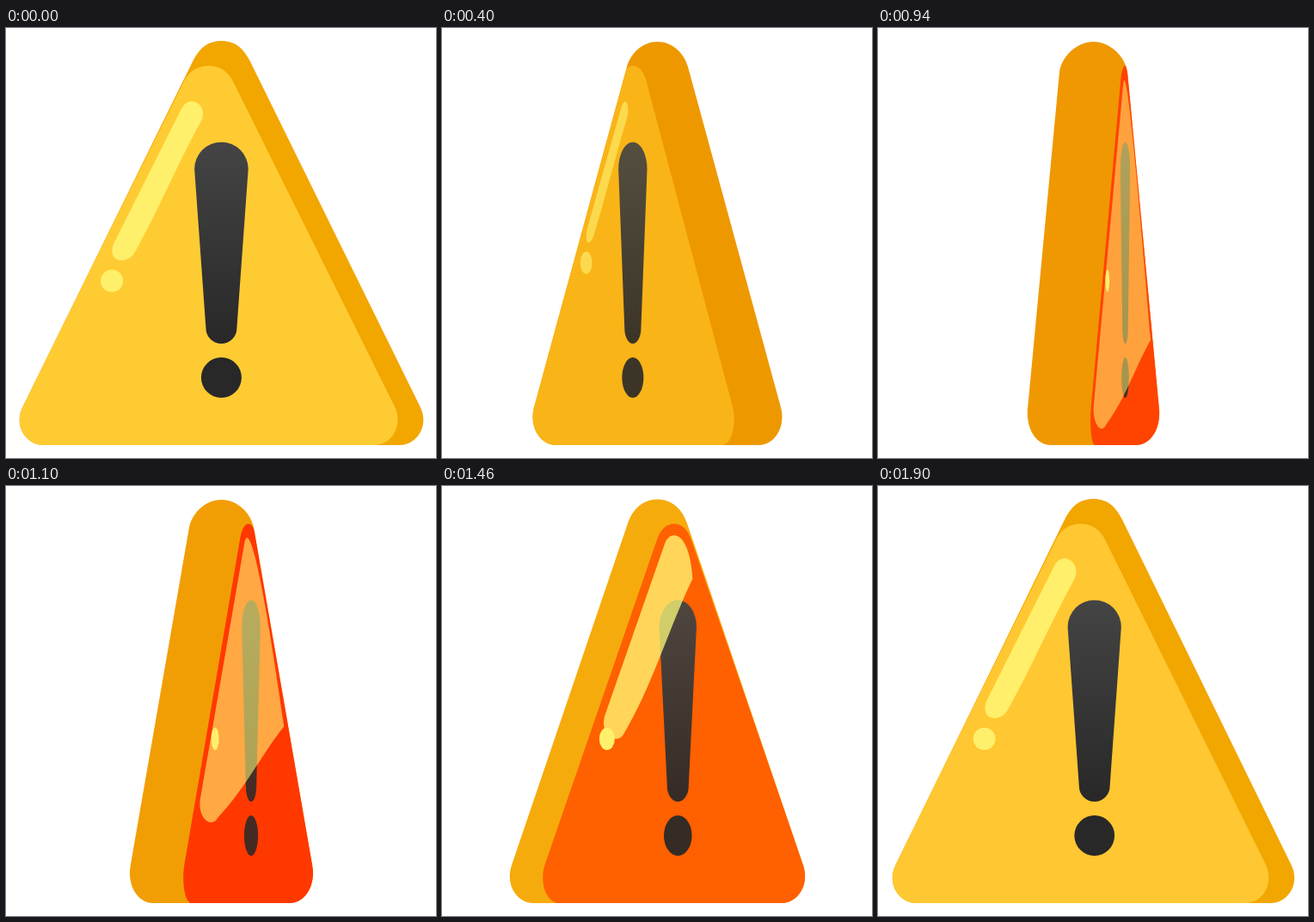
Write an HTML page with a canvas that moves like this. It is 500 px wide and 500 px high and loops after 1.92 s.

```html
<!DOCTYPE html>
<html lang="en">
<head>
<meta charset="utf-8">
<title>Turning warning sign</title>
<style>
html, body { margin: 0; width: 100%; height: 100%; overflow: hidden; background: #fff; }
canvas { display: block; width: 100vmin; height: 100vmin; }
</style>
</head>
<body>
<canvas id="stage" width="500" height="500"></canvas>
<script>
const ctx = document.getElementById('stage').getContext('2d');
const LOOP = 1920, EDGE_ON = 760, MID = 250.5, FACE_MID = 235.5;

// Turning away, then turning back with the face on the other side
const AWAY = { side: -1, speed: 1.135, rimDrop: 28, reach: 41, bend: 1.6 };
const BACK = { side: 1, speed: 1.17, rimDrop: 34, reach: 38, bend: 1.95 };

// Colour keys: time, red, green, blue
const FACE_COLOR = [[0, 255, 203, 51], [EDGE_ON, 243, 160, 0], [EDGE_ON, 255, 80, 0],
  [1260, 255, 45, 0], [1460, 255, 96, 0], [LOOP, 255, 203, 51]];
const SIDE_COLOR = [[0, 242, 166, 0], [400, 238, 152, 0], [900, 238, 150, 0],
  [1460, 246, 171, 12], [LOOP, 242, 166, 0]];

const mix = (a, b, f) => a + (b - a) * f;
const clamp = v => Math.min(1, Math.max(0, v));
const rgb = c => `rgb(${c.join()})`;

function colorAt(keys, t) {
  const i = keys.findIndex(k => k[0] > t), a = keys[i - 1], b = keys[i];
  const f = (t - a[0]) / (b[0] - a[0]);
  return rgb(a.map((v, k) => mix(v, b[k], f)).slice(1));
}

// Symmetric rounded triangle from its right half: cap controls and end, then lower corner
function triangle(c, top, [x1, x2, y2, x3, y3], [x4, y4, x5, y5, x6, x7]) {
  const p = new Path2D();
  p.moveTo(c, top);
  p.bezierCurveTo(c + x1, top, c + x2, y2, c + x3, y3);
  p.lineTo(c + x4, y4);
  p.bezierCurveTo(c + x5, y5, c + x6, 485, c + x7, 485);
  p.lineTo(c - x7, 485);
  p.bezierCurveTo(c - x6, 485, c - x5, y5, c - x4, y4);
  p.lineTo(c - x3, y3);
  p.bezierCurveTo(c - x2, y2, c - x1, top, c, top);
  return p;
}

function bodyPath(hw, s) {
  const e = 1 - s, a = 33 + 9 * e ** 1.5, y = 38 + 18 * e;
  return triangle(MID, 15 + Math.min(1, 2 * e),
    [a / 2, a - 7 * s - .5, y - 14 - 6 * e, a, y],
    [hw - 4.5 * s, 440, hw + 6 * s + 1, 462, hw - 8, hw - 28]);
}

const FACE = triangle(FACE_MID, 44, [14.5, 23.5, 52, 28.5, 62], [216.5, 440, 226, 459, 216, 192]);

// Reflection that shrinks from the whole face (r = 1) to a slim pill (r = 0)
function glossPath(r) {
  const q = Math.min(1, r / .4), spread = r ** 2.65, w = 24 + 90 * spread;
  const leftX = y => 204 - .503 * (y - 94) + 6 * r;
  const topY = 94 - 27 * q, topX = leftX(topY);
  const drop = 600 * Math.max(0, r - .42);
  const rightX = 227 + 40 * q + .52 * drop, rightY = 108 + drop;
  const bottom = 271 + 311 * spread;
  const endY = bottom - 20 - 10 * q, endX = leftX(endY);
  const lowX = endX + w, lowY = bottom - 9, rise = .3 * (lowY - rightY);
  const p = new Path2D();
  p.moveTo(topX, topY);
  p.bezierCurveTo(topX + 9, topY - 18, 236 + 26 * q, 89 - 38 * q, rightX, rightY);
  p.bezierCurveTo(mix(rightX, lowX, .33), rightY + rise, lowX + w * (1.1 + .4 * q), lowY - rise, lowX, lowY);
  p.bezierCurveTo(lowX - .35 * w, lowY + 13, endX - 8, endY + 22, endX, endY);
  p.closePath();
  return p;
}

const shade = ctx.createLinearGradient(0, 133, 0, 367);
shade.addColorStop(0, '#444');
shade.addColorStop(1, '#282828');

const MARK = new Path2D();
MARK.arc(0, 164, 31.3, Math.PI, 0);
MARK.lineTo(18, 349);
MARK.arc(0, 349, 18, 0, Math.PI);
MARK.closePath();

function disc(x, y, r) {
  ctx.beginPath();
  ctx.arc(x, y, r, 0, 7);
  ctx.fill();
}

// Draw squeezed sideways, with local x = mid landing on stage x
function squeezed(x, s, mid, paint) {
  ctx.save();
  ctx.translate(x, 0);
  ctx.scale(s, 1);
  ctx.translate(-mid, 0);
  paint();
  ctx.restore();
}

function draw(t) {
  const back = t >= EDGE_ON, turn = back ? BACK : AWAY;
  const open = back ? (t - EDGE_ON) / (LOOP - EDGE_ON) : 1 - t / EDGE_ON;
  const s = Math.max(.001, turn.speed * open - (turn.speed - 1) * open ** 5);
  const settle = clamp((t - 1460) / 440);
  const rim = Math.max(15, 43 - turn.rimDrop * s);
  const faceX = MID + turn.side * mix(rim, -rim, settle);
  const markX = MID + turn.side * turn.reach * (1 - open ** turn.bend);
  const glossAlpha = back ? .45 + .55 * open ** 1.3 : clamp(1 - 1.3 * (1 - open) ** 2);
  const fade = back ? 0 : 1 - s;
  const body = bodyPath(220.5 * s + rim, s);

  ctx.clearRect(0, 0, 500, 500);
  ctx.fillStyle = colorAt(SIDE_COLOR, t);
  ctx.fill(body);

  ctx.save();
  ctx.clip(body);
  squeezed(faceX, s, FACE_MID, () => {
    ctx.fillStyle = colorAt(FACE_COLOR, t);
    ctx.fill(FACE);
  });
  ctx.restore();

  squeezed(markX, s, 0, () => {
    ctx.globalAlpha = 1 - .2 * (1 - s);
    ctx.fillStyle = shade;
    ctx.fill(MARK);
    disc(0, 406.5, 23.5);
  });

  squeezed(faceX, s, FACE_MID, () => {
    const warm = back ? settle : 1;
    ctx.clip(FACE);
    ctx.globalAlpha = back ? 1 : glossAlpha;
    ctx.fillStyle = '#fff06b';
    const dot = () => disc(123 + 21 * fade, 294 - 45 * fade, 13);
    if (!back) dot();
    ctx.save();
    ctx.globalAlpha = glossAlpha;
    ctx.fillStyle = rgb([255, 255 - 15 * warm, 122 - 15 * warm]);
    // the pill thins, shortens and straightens while fading
    ctx.transform(1 - .8 * fade, 0, -.33 * fade, 1 - .24 * fade, 205 * fade, 20.6 * fade);
    ctx.fill(glossPath(back ? 1 - open : 0));
    ctx.restore();
    if (back) dot();
  });
}

function tick() {
  draw(performance.now() % LOOP);
  requestAnimationFrame(tick);
}
tick();
</script>
</body>
</html>
```
